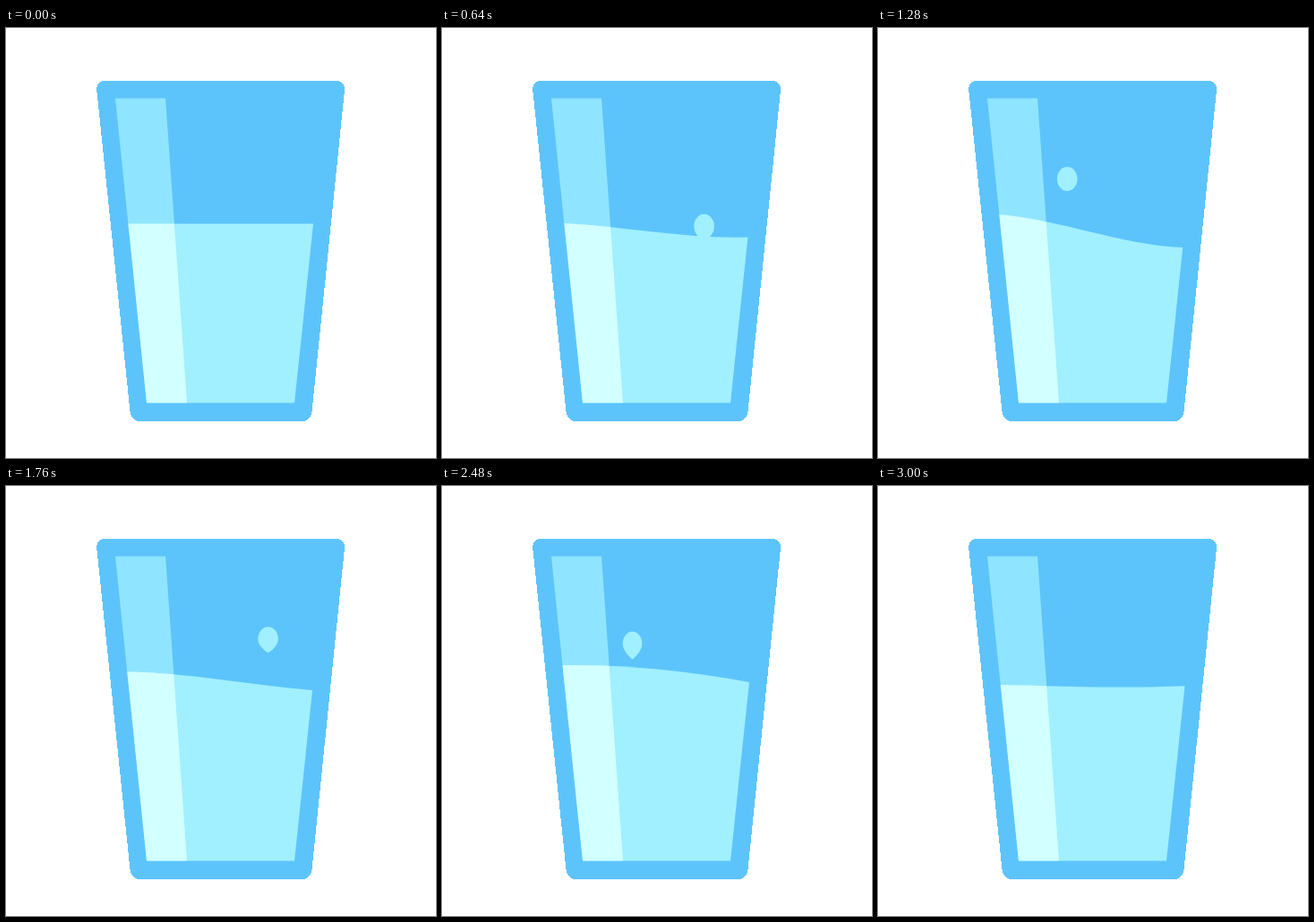
Write an HTML page with a canvas that moves like this. It is 480 px wide and 480 px high and loops after 3040 ms.

```html
<!DOCTYPE html>
<html lang="en">
<head>
<meta charset="utf-8">
<title>Glass of water</title>
<style>
html, body { margin: 0; width: 100%; height: 100%; overflow: hidden; background: #fff; }
canvas { display: block; width: 480px; height: 480px; }
</style>
</head>
<body>
<canvas id="stage" width="480" height="480"></canvas>
<script>
const ctx = document.getElementById('stage').getContext('2d');
const STEP = 40, HOP = 760, SWAY = 2 * HOP;
const TOP = 78.5, FLOOR = 418.5, REST = 218.5;
const GLASS = '#5dc4fb', SHINE = '#8fe5ff', WATER = '#a0f0ff', WET_SHINE = '#d2ffff';

// Key points over one hop: [time, value]
const rightDip = [[0, 0], [100, -12], [200, 0.4], [240, 9.5], [360, 19.5], [520, 26.5], [HOP, 0]];
const dropHeight = [[0, 245], [100, 202], [200, 176], [360, 160], [440, 153], [520, 168.5], [700, 245], [HOP, 245]];

const clamp = v => Math.max(0, Math.min(1, v));

// Smooth curve through key points
function curve(keys, t) {
  let i = 0;
  while (i < keys.length - 2 && t >= keys[i + 1][0]) i++;
  const a = keys[i], b = keys[i + 1];
  const before = keys[i - 1] || a, after = keys[i + 2] || b;
  const span = b[0] - a[0], s = (t - a[0]) / span, r = 1 - s;
  const slope = (p, q) => (q[1] - p[1]) / (q[0] - p[0]) * span;
  return r * r * (1 + 2 * s) * a[1] + s * r * r * slope(before, b)
    + s * s * (3 - 2 * s) * b[1] - s * s * r * slope(a, after);
}

const leftWall = y => 157 - (FLOOR - y) * 0.103;
const rightWall = y => 322 + (FLOOR - y) * 0.105;

// Filled row by row to keep the outer edge crisp
function drawGlass() {
  const top = 59, bottom = 439, radius = 10;
  ctx.fillStyle = GLASS;
  for (let y = top; y < bottom; y++) {
    const mid = y + 0.5, k = (mid - top) / (bottom - top);
    const d = Math.max(0, radius - Math.min(mid - top, bottom - mid));
    const inset = radius - Math.sqrt(radius * radius - d * d);
    const x0 = Math.round(100.2 + 39.4 * k + inset);
    const x1 = Math.round(379 - 38.6 * k - inset);
    ctx.fillRect(x0, y, x1 - x0, 1);
  }
}

function fillStrip(color) {
  ctx.beginPath();
  ctx.moveTo(122, TOP);
  ctx.lineTo(178, TOP);
  ctx.lineTo(202, FLOOR);
  ctx.lineTo(157, FLOOR);
  ctx.fillStyle = color;
  ctx.fill();
}

function drawWater(u, second) {
  // The left end swells and fades, higher on the second hop
  const lift = (second ? 24.6 : 13.8) * Math.sin(Math.PI * u / 650) * (1 - u / HOP) ** 0.3;
  const dip = curve(rightDip, u);
  const left = REST - lift, right = REST + dip;
  const x0 = leftWall(left), x1 = rightWall(right);
  const third = (x1 - x0) / 3, rise = (right - left) / 3;
  const bend1 = -0.4 * lift - 0.1 * dip, bend2 = 0.5 * dip - 0.35 * lift;

  ctx.beginPath();
  ctx.moveTo(x0, left);
  ctx.bezierCurveTo(x0 + third, left + rise + bend1, x1 - third, right - rise + bend2, x1, right);
  ctx.lineTo(rightWall(FLOOR), FLOOR);
  ctx.lineTo(leftWall(FLOOR), FLOOR);
  ctx.fillStyle = WATER;
  ctx.fill();
  ctx.save();
  ctx.clip();
  fillStrip(WET_SHINE);
  ctx.restore();
}

// Pointed while it rises, round at the peak, slightly long in the fall
function drawDrop(x, u) {
  const y = curve(dropHeight, u), K = 0.5523;
  const tip = clamp((360 - u) / 160), fall = clamp((u - 440) / 80);
  const w = 12.8 - 2 * tip - 1.5 * fall;
  const up = 12.8 + 0.8 * (tip + fall);
  const down = 12.8 + 4.7 * tip * tip + 0.7 * fall;
  const side = y + down * (K - 0.12 * tip);
  const tipX = w * (K - 0.2 * tip), tipY = y + down * (1 - 0.18 * tip);

  ctx.beginPath();
  ctx.moveTo(x - w, y);
  ctx.bezierCurveTo(x - w, y - up * K, x - w * K, y - up, x, y - up);
  ctx.bezierCurveTo(x + w * K, y - up, x + w, y - up * K, x + w, y);
  ctx.bezierCurveTo(x + w, side, x + tipX, tipY, x, y + down);
  ctx.bezierCurveTo(x - tipX, tipY, x - w, side, x - w, y);
  ctx.fillStyle = WATER;
  ctx.fill();
}

function draw(time) {
  const t = Math.floor(time / STEP) * STEP % SWAY;
  const u = t % HOP, second = t >= HOP;
  ctx.fillStyle = '#fff';
  ctx.fillRect(0, 0, 480, 480);
  drawGlass();
  fillStrip(SHINE);
  drawDrop(second ? 213.4 - u * 0.0043 : 292.6, u);
  drawWater(u, second);
}

let start;
function tick(now) {
  if (start === undefined) start = now;
  draw(now - start);
  requestAnimationFrame(tick);
}
draw(0);
requestAnimationFrame(tick);
</script>
</body>
</html>
```
